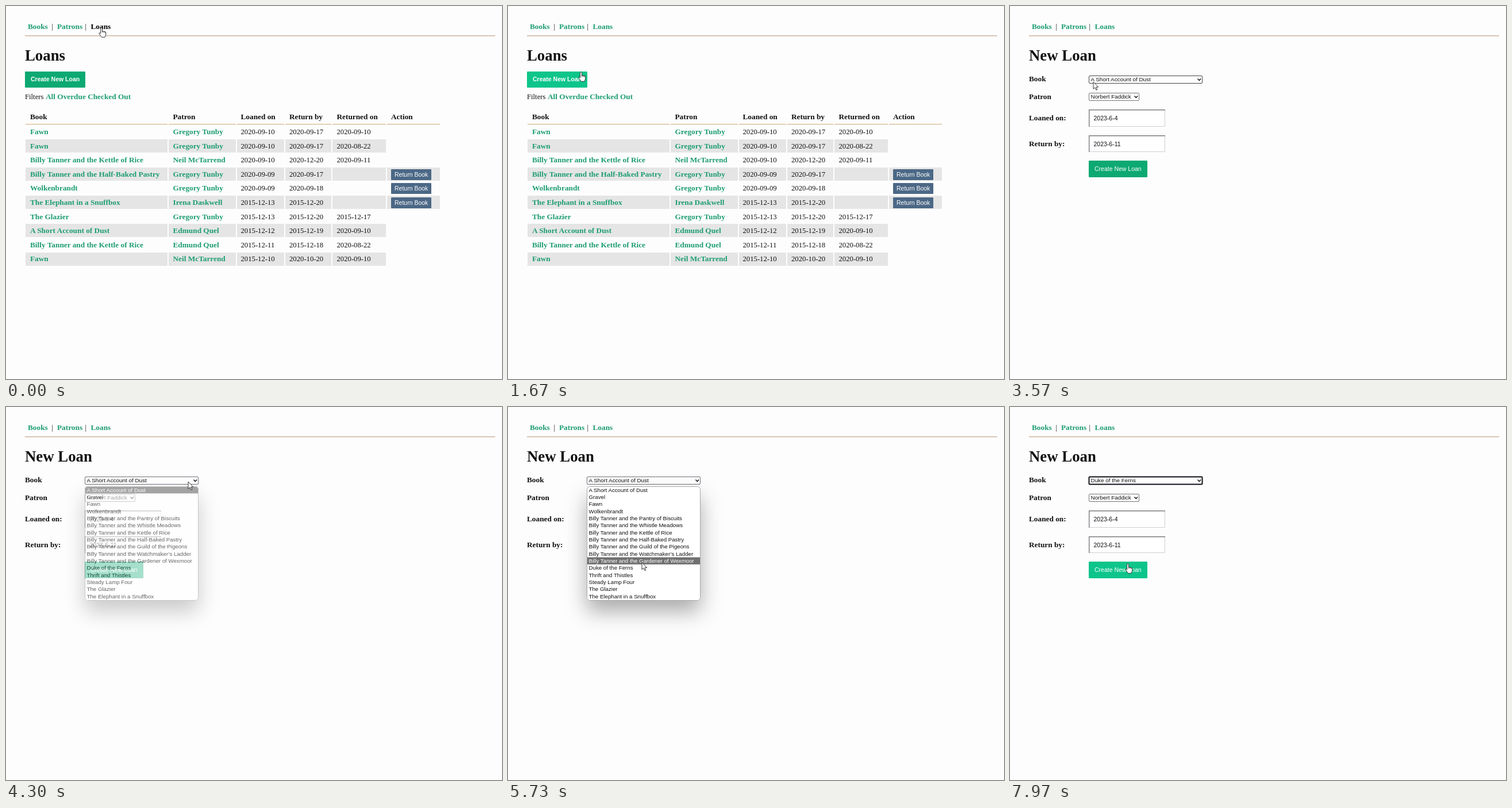
These frames come from a looping animation (863x649 px, 8000 ms). An HTML page:

```html
<!DOCTYPE html>
<html lang="en">
<head>
<meta charset="utf-8">
<title>Library loans</title>
<style>
  html, body { margin: 0; width: 100%; height: 100%; overflow: hidden; background: #fdfdfd; }
  svg { display: block; width: 863px; height: 649px; cursor: default; }
  text { font: 12.7px "Liberation Serif", serif; fill: #111; white-space: pre; }
  .bold { font-weight: bold; font-size: 13.3px; }
  .link { font-weight: bold; font-size: 13.3px; fill: #1d9d70; }
  .link.hover { fill: #000; }
  .title { font-weight: bold; font-size: 26.8px; }
  .ui { font: 10.5px "Liberation Sans", Arial, sans-serif; }
  .select { font: 9.9px "Liberation Sans", Arial, sans-serif; }
  .option { font: 9.7px "Liberation Sans", Arial, sans-serif; }
  .white { fill: #fff; }
  .strong { font-weight: bold; }
  .button { fill: #0da973; }
  .button.hover { fill: #0dc58a; }
  .popup-box { filter: drop-shadow(0 19px 18px rgba(0, 0, 0, .32)); }
</style>
</head>
<body>
<svg id="stage" viewBox="0 0 863 649"></svg>
<script>
const LOOP = 8000;
const PAGE_CHANGE = 2670, POPUP_OPEN = 4200, POPUP_CLOSE = 6270;
const ROW = 12.35, POPUP_TOP = 138;

const SERIES = 'Billy Tanner and the ';
const KETTLE = SERIES + 'Kettle of Rice', PASTRY = SERIES + 'Half-Baked Pastry';
const DUST = 'A Short Account of Dust', FERNS = 'Duke of the Ferns';
const SNUFFBOX = 'The Elephant in a Snuffbox';
const GREGORY = 'Gregory Tunby', NEIL = 'Neil McTarrend', EDMUND = 'Edmund Quel';

const loans = [
  ['Fawn', GREGORY, '2020-09-10', '2020-09-17', '2020-09-10'],
  ['Fawn', GREGORY, '2020-09-10', '2020-09-17', '2020-08-22'],
  [KETTLE, NEIL, '2020-09-10', '2020-12-20', '2020-09-11'],
  [PASTRY, GREGORY, '2020-09-09', '2020-09-17', ''],
  ['Wolkenbrandt', GREGORY, '2020-09-09', '2020-09-18', ''],
  [SNUFFBOX, 'Irena Daskwell', '2015-12-13', '2015-12-20', ''],
  ['The Glazier', GREGORY, '2015-12-13', '2015-12-20', '2015-12-17'],
  [DUST, EDMUND, '2015-12-12', '2015-12-19', '2020-09-10'],
  [KETTLE, EDMUND, '2015-12-11', '2015-12-18', '2020-08-22'],
  ['Fawn', NEIL, '2015-12-10', '2020-10-20', '2020-09-10'],
];

const options = [
  DUST, 'Gravel', 'Fawn', 'Wolkenbrandt', SERIES + 'Pantry of Biscuits',
  SERIES + 'Whistle Meadows', KETTLE, PASTRY, SERIES + 'Guild of the Pigeons',
  SERIES + 'Watchmaker\u2019s Ladder', SERIES + 'Gardener of Wexmoor', FERNS,
  'Thrift and Thistles', 'Steady Lamp Four', 'The Glazier', SNUFFBOX,
];

// Column title, left edge, right edge, text start
const columns = [
  ['Book', 34, 281, 42], ['Patron', 283, 400, 290.5], ['Loaned on', 402, 484, 408.5],
  ['Return by', 486, 566, 493], ['Returned on', 568, 661, 575.5], ['Action', 663, 755, 670],
];

// Pointer path: time, x, y
const path = [
  [0, 166, 38], [900, 166, 38], [1670, 127, 115], [2030, 112, 130], [3370, 112, 130],
  [3570, 145, 132], [4130, 317, 130], [4900, 317, 130], [5000, 306.5, 149],
  [5730, 233, 270.5], [6100, 225, 281], [6770, 225, 281], [7070, 229, 238],
  [7230, 229, 238], [7900, 205, 273], [LOOP, 205, 273],
];

const text = (x, y, content, cls = '', extra = '') =>
  `<text x="${x}" y="${y}" class="${cls}" ${extra}>${content}</text>`;
const rect = (x, y, w, h, fill, extra = '') =>
  `<rect x="${x}" y="${y}" width="${w}" height="${h}" fill="${fill}" ${extra}/>`;
const button = (id, x, y, w, h) => rect(x, y, w, h, '', `id="${id}" class="button" rx="1"`);

function loanTable() {
  let out = '';
  for (const [name, left, right, x] of columns) {
    out += text(x, 197, name, 'bold') + rect(left, 205, right - left, 1.4, '#d8bd95');
  }
  loans.forEach((loan, i) => {
    const y = 219 + i * 24.56, open = !loan[4];
    columns.forEach(([, left, right, x], c) => {
      if (i % 2 && (c < 5 || open)) {
        out += rect(left, Math.round(y - 11.5), right - left, 23, '#e5e5e5');
      }
      if (c < 5) out += text(x, y + 4.2, loan[c], c < 2 ? 'link' : '');
    });
    if (open) {
      out += rect(670, Math.round(y - 9), 70, 19, '#4b6886', 'rx="1"')
        + text(676, y + 4, 'Return Book', 'ui white');
    }
  });
  return out;
}

const selectBox = (id, y, w, h, label) =>
  rect(137.5, y + .5, w - 1, h - 1, '#fff', `id="${id}" stroke="#767676" rx="1.5"`)
  + text(140.5, y + 10.3, label, 'select', `id="${id}Label"`)
  + `<path d="M${137 + w - 8.5} ${y + 5.5}l2.8 2.9 2.8-2.9" fill="none" stroke="#111" stroke-width="1.5"/>`;

const inputBox = (y, h, value) =>
  rect(137, y, 133, h, '#fff')
  + `<path d="M269.5 ${y}V${y + h - .5}H137" fill="none" stroke="#cfcfd6"/>`
  + `<path d="M137.7 ${y + h}V${y + .7}H270" fill="none" stroke="#7c7c82" stroke-width="1.4"/>`
  + text(145.5, y + 18.8, value, 'ui');

const labels = [['Book', 131], ['Patron', 162], ['Loaned on:', 199], ['Return by:', 243.5]];

stage.innerHTML = `
  ${text(38, 39.5, 'Books', 'link')}${text(79.5, 39.5, '|')}
  ${text(89, 39.5, 'Patrons', 'link')}${text(137.5, 39.5, '|')}
  ${text(147.5, 39.5, 'Loans', 'link', 'id="navLoans"')}
  ${rect(33, 51, 818, 1.5, '#cdb5a0')}
  <g id="listPage">
    ${text(33, 95, 'Loans', 'title')}
    ${button('newButton', 33, 114, 105, 28)}
    ${text(43, 131.3, 'Create New Loan', 'ui white strong')}
    ${text(33, 161.7, 'Filters')}${text(69, 161.7, 'All Overdue Checked Out', 'link')}
    ${loanTable()}
  </g>
  <g id="formPage">
    ${text(33, 95, 'New Loan', 'title')}
    ${labels.map(([name, y]) => text(33, y, name, 'bold')).join('')}
    ${selectBox('bookSelect', 121, 198, 14, DUST)}
    ${selectBox('patronSelect', 151, 88, 14, 'Norbert Faddick')}
    ${inputBox(180, 30, '2023-6-4')}${inputBox(225, 29, '2023-6-11')}
    ${button('saveButton', 137, 269, 102, 29)}
    ${text(147, 286.7, 'Create New Loan', 'ui white')}
  </g>
  <g id="popup">
    <clipPath id="popupClip">${rect(137, POPUP_TOP, 198, 199, '#000', 'rx="5"')}</clipPath>
    ${rect(137, POPUP_TOP, 198, 199, '#fff', 'rx="5" class="popup-box"')}
    <g clip-path="url(#popupClip)">
      ${rect(137, 0, 198, ROW, '#707070', 'id="highlight"')}
      ${options.map((name, i) => text(140.5, 147.5 + i * ROW, name, 'option')).join('')}
    </g>
    ${rect(137.5, POPUP_TOP + .5, 197, 198, 'none', 'rx="5" stroke="#a8a8a8"')}
  </g>
  <g id="pointer" stroke-linejoin="round">
    <path id="arrow" d="M0 0V12.3L2.9 9.8 4.9 14.2 6.8 13.4 4.9 9.1H8.7Z" fill="#fff" stroke="#222" stroke-width=".9"/>
    <g id="hand" stroke="#222" stroke-width=".9">
      <path d="M-1.4 1.2a1.4 1.4 0 0 1 2.8 0V5.6l5 1.1q1.7.5 1.6 2.4l-.7 4-1.3 3.2H.3L-3.8 10.4q-.8-2 1-1.6l1.4 1.2Z" fill="#fff"/>
      <path d="M1.4 5.6V8M3.9 6.2V8.3M6.3 6.8V8.8" fill="none"/>
    </g>
    <path id="beam" d="M-2.5-7H-.7L0-6.4.7-7H2.5M0-6.4V6.4M-2.5 7H-.7L0 6.4.7 7H2.5" fill="none" stroke="#222"/>
  </g>`;

const $ = Object.fromEntries([...stage.querySelectorAll('[id]')].map(el => [el.id, el]));
const optionLabels = [...stage.querySelectorAll('.option')];
const clamp = v => Math.min(1, Math.max(0, v));
const show = (el, on) => el.setAttribute('display', on ? 'inline' : 'none');

function pointerAt(t) {
  const i = path.findIndex(p => p[0] > t);
  const [t0, x0, y0] = path[i - 1], [t1, x1, y1] = path[i];
  const u = (t - t0) / (t1 - t0), e = u * u * (3 - 2 * u);
  return [x0 + (x1 - x0) * e, y0 + (y1 - y0) * e];
}

function draw(t) {
  const [x, y] = pointerAt(t);
  const over = (left, top, right, bottom) => x >= left && x < right && y >= top && y < bottom;
  const onForm = t >= PAGE_CHANGE, chosen = t >= POPUP_CLOSE;
  const popupOpen = t >= POPUP_OPEN && !chosen;

  show($.listPage, !onForm);
  show($.formPage, onForm);

  const overNav = over(147, 28, 183, 45);
  const overNew = !onForm && over(33, 114, 138, 142);
  const overSave = onForm && !popupOpen && over(137, 269, 239, 298);
  const overInput = onForm && !popupOpen && over(137, 225, 270, 254);
  $.navLoans.classList.toggle('hover', overNav);
  $.newButton.classList.toggle('hover', overNew);
  $.saveButton.classList.toggle('hover', overSave);

  $.bookSelectLabel.textContent = chosen ? FERNS : DUST;
  const overSelect = over(137, 121, 335, 135);
  $.bookSelect.setAttribute('stroke', chosen ? '#101018' : overSelect && !popupOpen ? '#444' : '#70707c');
  $.bookSelect.setAttribute('stroke-width', chosen ? 2 : 1);

  const opacity = clamp((t - POPUP_OPEN) / 160) * (1 - clamp((t - POPUP_CLOSE) / 80));
  show($.popup, opacity > 0);
  $.popup.setAttribute('opacity', opacity);
  const active = chosen ? 11 : Math.max(0, Math.floor((y - POPUP_TOP) / ROW));
  $.highlight.setAttribute('y', POPUP_TOP + active * ROW);
  optionLabels.forEach((el, i) => el.classList.toggle('white', i === active));

  const overLink = overNav || overNew || overSave;
  show($.hand, overLink);
  show($.beam, overInput);
  show($.arrow, !overLink && !overInput);
  $.pointer.setAttribute('transform', `translate(${x} ${y})`);
}

const start = performance.now();
function tick() {
  draw((performance.now() - start) % LOOP);
  requestAnimationFrame(tick);
}
tick();
</script>
</body>
</html>
```
